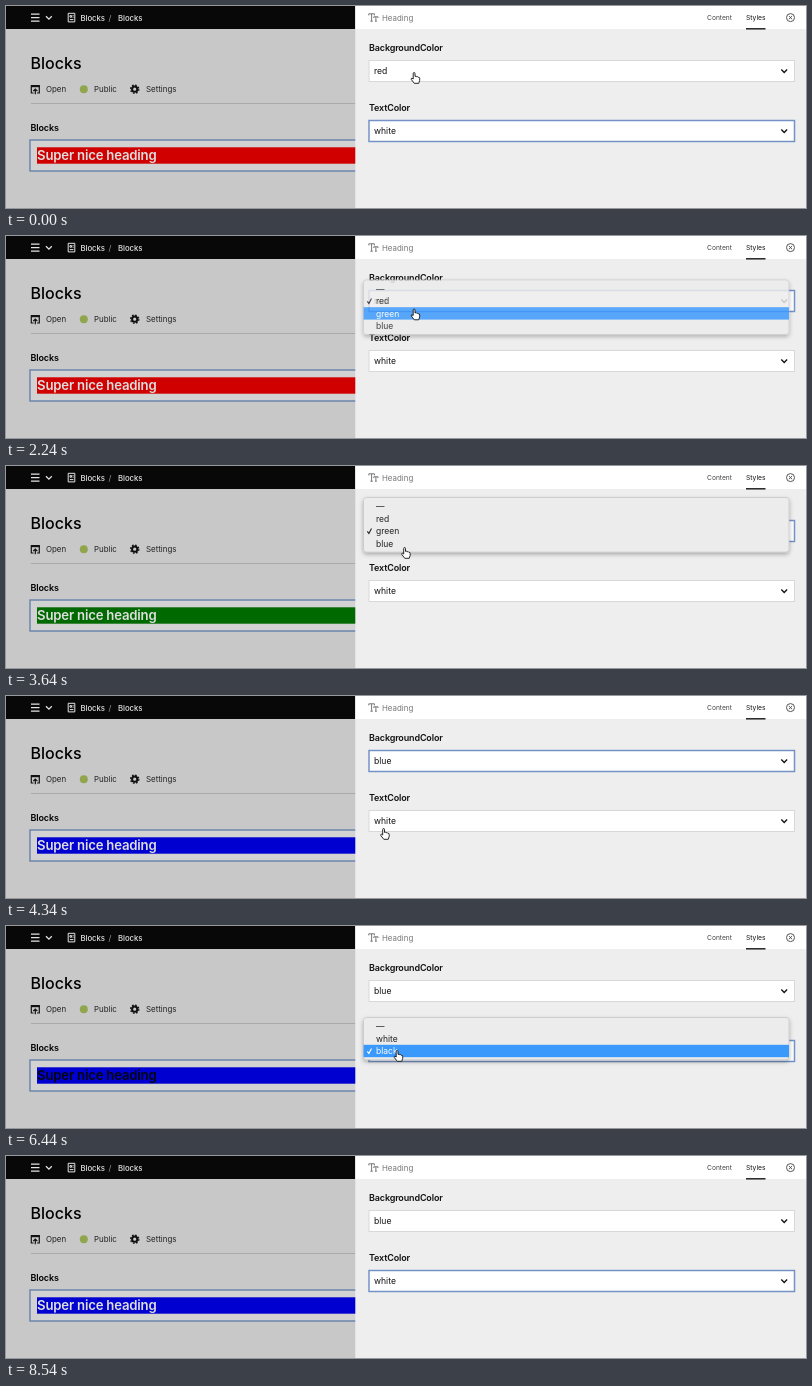
An HTML page for the animation above (8610 ms loop, 800x202 px).

```html
<!DOCTYPE html>
<html lang="en">
<head>
<meta charset="utf-8">
<title>Block styles</title>
<style>
  html, body { margin: 0; width: 100%; height: 100%; overflow: hidden; background: #eee; }
  svg { display: block; width: 800px; height: 202px; font-family: Inter, "Open Sans", sans-serif; }
  .label { font-size: 9px; font-weight: 600; letter-spacing: -.15px; }
  .crumb { font-size: 7.8px; font-weight: 500; letter-spacing: -.08px; fill: #e4e4e4; }
  .small { font-size: 7.9px; }
  .tab { font-size: 6.7px; }
  .value { font-size: 8.6px; }
  .option { font-size: 8.5px; }
  .line { fill: none; stroke: currentColor; }
</style>
</head>
<body>
<svg viewBox="0 0 800 202">
  <defs>
    <filter id="shadow" x="-5%" y="-20%" width="110%" height="150%">
      <feDropShadow dx="0" dy="2" stdDeviation="2" flood-opacity=".3"/>
    </filter>
  </defs>

  <!-- Page behind the panel -->
  <rect width="350" height="202" fill="#c8c8c8"/>
  <rect width="350" height="23" fill="#080808"/>
  <g class="line" color="#e4e4e4">
    <path d="M25 8.2h8.5M25 11.7h8.5M25 15.2h8.5" stroke-width="1.3"/>
    <path d="M40 10.3l2.9 2.9 2.9-2.9" stroke-width="1.3"/>
    <path d="M62.2 7.3h6.6v8.6h-6.6zM64 9.6h1.6v1.6h-1.6zM66.6 9.6h1M66.6 11.2h1M63.8 13.6h3.6"/>
  </g>
  <text class="crumb" x="74.5" y="14.6">Blocks</text>
  <text class="crumb" x="102.5" y="14.6" style="fill:#888">/</text>
  <text class="crumb" x="112" y="14.6">Blocks</text>

  <text x="24.5" y="63" font-size="16" font-weight="500">Blocks</text>
  <g class="line" color="#111">
    <path d="M27.5 87h-2.2v-7.3h8v7.3h-2.2M29.3 88.2v-4.8M27.2 85.2l2.1-2.1 2.1 2.1" stroke-width="1.2"/>
    <path d="M25 80.3h8.6" stroke-width="1.8"/>
    <circle cx="128.7" cy="83.2" r="2.6" stroke-width="2"/>
    <circle cx="128.7" cy="83.2" r="4" stroke-width="1.5" stroke-dasharray="1.57 1.57"/>
  </g>
  <circle cx="77.8" cy="83.2" r="4" fill="#91a54c"/>
  <g class="small" fill="#222">
    <text x="40" y="86.2">Open</text>
    <text x="88" y="86.2">Public</text>
    <text x="140" y="86.2">Settings</text>
  </g>
  <path d="M25 97.5h325" stroke="#aaa"/>
  <text class="label" x="24.5" y="125">Blocks</text>
  <rect x="24" y="134" width="340" height="31" fill="#d2d2d2" stroke="#6681ab" stroke-width="1.4"/>
  <rect id="bar" x="31" y="141.3" width="330" height="16.4"/>
  <text id="heading" x="31" y="154.4" font-size="13.2" font-weight="600" letter-spacing="-.2">Super nice heading</text>

  <!-- Panel -->
  <rect x="349.3" width="451" height="202" fill="#eee"/>
  <rect x="349.3" width="451" height="23" fill="#fff"/>
  <g class="line" color="#777">
    <path d="M362.8 9.4v-1.6h5.6v1.6M365.6 7.8v7.4M364.4 15.2h2.4M367.8 12v-1.2h4.2v1.2M369.9 10.8v4.4M369 15.2h1.8"/>
    <circle cx="784.5" cy="11.6" r="4" stroke="#444" stroke-width=".9"/>
    <path d="M782.9 10l3.2 3.2M786.1 10l-3.2 3.2" stroke="#444" stroke-width=".9"/>
  </g>
  <text class="small" x="376" y="14.8" fill="#777">Heading</text>
  <text class="tab" x="701" y="14.2" fill="#444">Content</text>
  <text class="tab" x="740" y="14.2" fill="#111">Styles</text>
  <path d="M740 22.8h19.5" stroke="#222" stroke-width="1.5"/>
  <g id="fields"></g>
  <g id="menu"></g>
  <path id="hand" fill="#fff" stroke="#111" stroke-width=".9" stroke-linejoin="round"
    d="M-2.3 1V-4.4Q-2.3 -5.5 -1.4 -5.5T-.5 -4.4V-1.6Q.8 -2.4 1.2 -1.2Q2.4 -1.8 2.8 -.7Q4.2 -1 4.2 .6V2.4L3.2 5.3H-1.2L-4.2 1.5Q-4.6 .3 -3.6 .2Z"/>
</svg>
<script>
const LOOP = 8610, ROW = 12.4, BLINK = 60, FADE = 250;
const $ = id => document.getElementById(id);

const fields = [
  { name: 'BackgroundColor', y: 65, start: 'red', options: ['—', 'red', 'green', 'blue'] },
  { name: 'TextColor', y: 125, start: 'white', options: ['—', 'white', 'black'] }
];
const shades = { red: '#d00000', green: '#006a00', blue: '#0000d0', white: '#dedede', black: '#050510' };

// Each pick opens a menu, then clicks an option
const picks = [
  { field: 0, open: 910, click: 2080, to: 'green' },
  { field: 0, open: 2940, click: 3610, to: 'blue' },
  { field: 1, open: 4690, click: 5380, to: 'black' },
  { field: 1, open: 6160, click: 6970, to: 'white' }
];
for (const p of picks) {
  p.fade = p.click + 2 * BLINK;
  p.set = p.fade + 150;
}

// Pointer stops: time, x, y
const stops = [
  [0, 409.5, 72], [1400, 409.5, 72], [1820, 409.5, 78.5], [2310, 409.5, 78.5],
  [2730, 400, 72], [3000, 400, 72], [3500, 400, 87], [3850, 400, 87],
  [4340, 379, 138], [4550, 379, 132], [4760, 379, 132], [5300, 392.5, 142],
  [5700, 392.5, 142], [6090, 392.5, 130], [6510, 392.5, 130], [6860, 392.5, 118],
  [7350, 392.5, 118], [7770, 392.5, 214]
];

const text = (cls, x, y, s, fill = '#111') =>
  `<text class="${cls}" x="${x}" y="${y}" fill="${fill}">${s}</text>`;

function pointer(t) {
  const i = stops.findIndex(s => s[0] > t);
  if (i < 0) return stops.at(-1).slice(1);
  const [t0, x0, y0] = stops[i - 1], [t1, x1, y1] = stops[i];
  const u = (t - t0) / (t1 - t0), e = u * u * (3 - 2 * u);
  return [x0 + (x1 - x0) * e, y0 + (y1 - y0) * e];
}

function valueAt(i, t) {
  const done = picks.filter(p => p.field === i && t >= p.set);
  return done.length ? done.at(-1).to : fields[i].start;
}

function drawField({ name, y }, value, focused) {
  const edge = focused ? 'stroke="#7592c6" stroke-width="1.5"' : 'stroke="#d8d8d8"';
  return text('label', 363, y - 19.6, name) +
    `<rect x="363" y="${y - 10.5}" width="425.5" height="21" fill="#fff" ${edge}/>` +
    text('value', 368, y + 3.2, value) +
    `<path d="M775.3 ${y - 1.4}l2.9 2.9 2.9-2.9" fill="none" stroke="#111" stroke-width="1.4"/>`;
}

function drawMenu(p, t, tip) {
  const { y, options } = fields[p.field];
  const checked = options.indexOf(valueAt(p.field, p.open));
  const first = y - checked * ROW;
  const hover = t < p.click ? Math.round((tip - first) / ROW)
    : t < p.click + BLINK ? -1 : options.indexOf(p.to);
  const rows = options.map((s, i) => {
    const cy = first + i * ROW, on = i === hover;
    const back = on ? `<rect x="357.5" y="${cy - ROW / 2}" width="425.5" height="${ROW}" fill="#3b99fc"/>` : '';
    const tick = i === checked
      ? `<path d="M361.3 ${cy + .4}l1.6 2 2.6-4.8" fill="none" stroke="${on ? '#fff' : '#222'}" stroke-width="1.1"/>` : '';
    return back + tick + text('option', 370, cy + 3.1, s, on ? '#fff' : '#222');
  }).join('');
  return `<rect x="357.5" y="${first - 8.7}" width="425.5" height="${options.length * ROW + 5}" rx="3"
    fill="#ececec" stroke="#c4c4c4" stroke-width=".7" filter="url(#shadow)"/>` + rows;
}

function draw(t) {
  const values = fields.map((f, i) => valueAt(i, t));
  const opened = picks.filter(p => t >= p.open).at(-1);
  const focus = opened ? opened.field : 1;
  const [x, y] = pointer(t);

  $('bar').setAttribute('fill', shades[values[0]]);
  $('heading').setAttribute('fill', shades[values[1]]);
  $('fields').innerHTML = fields.map((f, i) => drawField(f, values[i], i === focus)).join('');

  const showing = opened && t < opened.fade + FADE;
  $('menu').innerHTML = showing ? drawMenu(opened, t, y - 5) : '';
  $('menu').setAttribute('opacity', showing ? Math.min(1, 1 - (t - opened.fade) / FADE) : 0);
  $('hand').setAttribute('transform', `translate(${x} ${y})`);
}

const began = performance.now();
function tick() {
  draw((performance.now() - began) % LOOP);
  requestAnimationFrame(tick);
}
tick();
</script>
</body>
</html>
```
